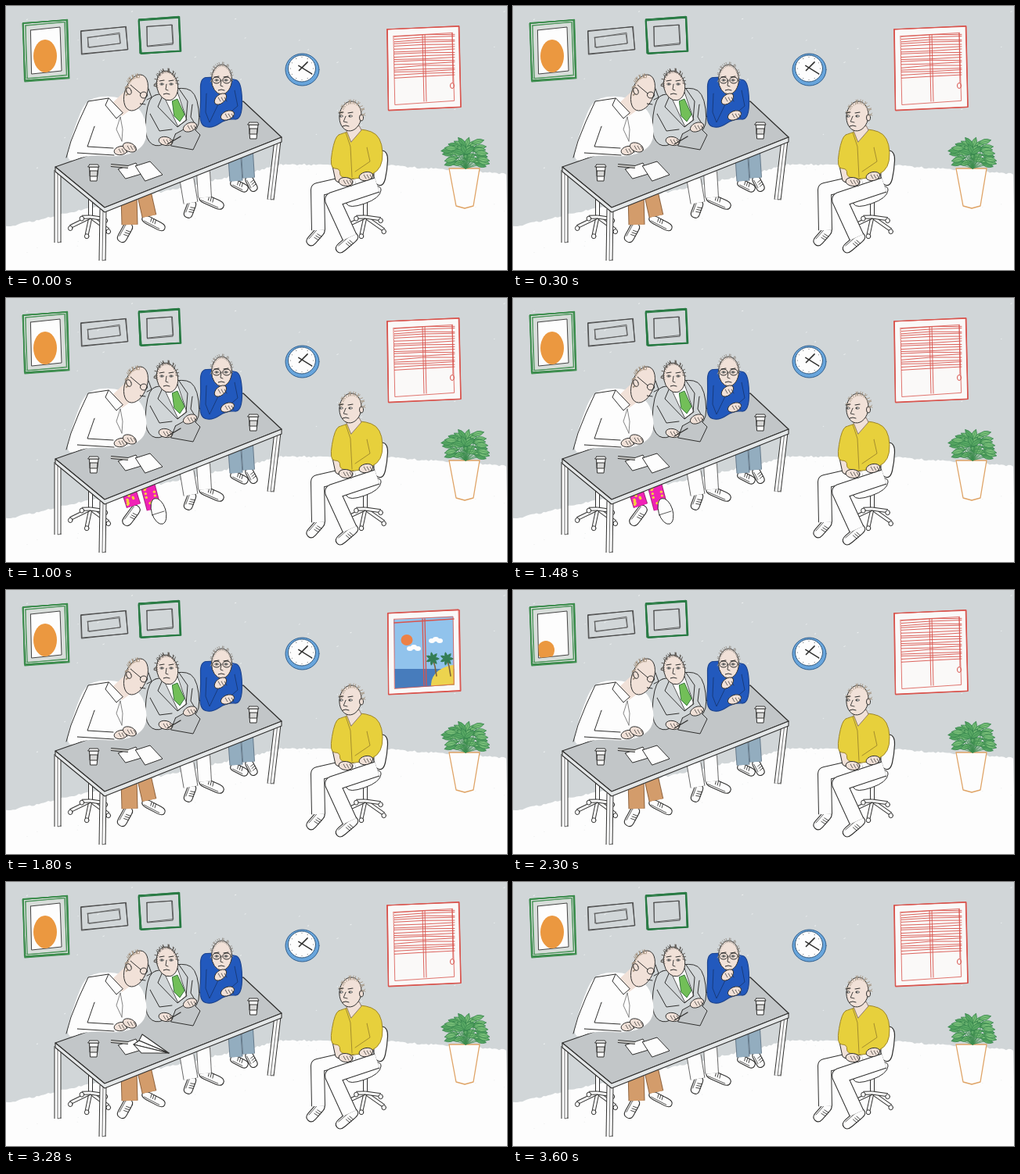
An HTML page with a canvas that plays this animation: 640x338 px, repeating every 4100 ms.

```html
<!DOCTYPE html>
<html lang="en">
<head>
<meta charset="utf-8">
<title>Interview room</title>
<style>
html, body { margin: 0; width: 100%; height: 100%; overflow: hidden; background: #fdfdfd; }
canvas { display: block; width: 640px; height: 338px; }
</style>
</head>
<body>
<canvas id="stage"></canvas>
<script>
const canvas = document.getElementById('stage');
const ctx = canvas.getContext('2d');
const ratio = window.devicePixelRatio || 1;
canvas.width = 640 * ratio;
canvas.height = 338 * ratio;

const INK = '#30302f', WALL = '#d1d6d8', WHITE = '#fdfdfd', SKIN = '#f1e1d8';
const RED = '#d9534c', GREEN = '#3b8c4c', TOP = '#c2c6c8';
const { PI, sin, cos, atan2, hypot } = Math;

let seed;
const random = () => (seed = seed * 16807 % 2147483647) / 2147483647;
const jitter = size => (random() - 0.5) * 2 * size;
const repeat = (count, action) => { for (let i = 0; i < count; i++) action(i); };

function paint(fill, color, width = 1) {
  if (fill) { ctx.fillStyle = fill; ctx.fill(); }
  if (color) { ctx.strokeStyle = color; ctx.lineWidth = width; ctx.stroke(); }
}

function route(points) {
  ctx.beginPath();
  points.forEach(([x, y]) => ctx.lineTo(x, y));
}

function polygon(points, fill, color = INK, width = 1) {
  route(points);
  ctx.closePath();
  paint(fill, color, width);
}

function line(points, width = 1, color = INK) {
  route(points);
  paint(null, color, width);
}

// Closed soft outline that bends around its corner points.
function blob(points, fill, color = INK, width = 1) {
  ctx.beginPath();
  const n = points.length;
  for (let i = 0; i <= n; i++) {
    const [x, y] = points[i % n], [nx, ny] = points[(i + 1) % n];
    if (i === 0) ctx.moveTo((x + nx) / 2, (y + ny) / 2);
    else ctx.quadraticCurveTo(x, y, (x + nx) / 2, (y + ny) / 2);
  }
  paint(fill, color, width);
}

function oval(x, y, rx, ry, fill, color, turn = 0, width = 1) {
  ctx.beginPath();
  ctx.ellipse(x, y, rx, ry, turn, 0, PI * 2);
  paint(fill, color, width);
}

// Outlined strip with open ends, for legs and arms.
function limb(points, width, fill = WHITE, color = INK) {
  ctx.lineCap = 'butt';
  line(points, width + 1, color);
  line(points, width - 1, fill);
  ctx.lineCap = 'round';
}

function panel(x, y, w, h, rise, inset = 0) {
  const l = x + inset, r = x + w - inset, t = y + inset, b = y + h - inset;
  return [[l, t], [r, t - rise], [r + 2, b - rise], [l + 2, b]];
}

function sketch(points, color, width, passes = 2) {
  repeat(passes, () => polygon(points.map(([x, y]) => [x + jitter(1), y + jitter(1)]), null, color, width));
}

function clipped(points, action) {
  ctx.save();
  route(points);
  ctx.clip();
  action();
  ctx.restore();
}

function shoe(heelX, heelY, toeX, toeY, width = 11) {
  const length = hypot(toeX - heelX, toeY - heelY), w = width / 2;
  ctx.save();
  ctx.translate(heelX, heelY);
  ctx.rotate(atan2(toeY - heelY, toeX - heelX));
  blob([[-3, -w], [length * 0.5, -w], [length + 3, -w], [length + 3, w], [length * 0.5, w], [-3, w]], WHITE, INK, 1.1);
  line([[1, w - 2], [length - 3, w - 2]], 0.7);
  repeat(3, i => line([[length * 0.3 + i * 3, -w], [length * 0.3 + i * 3 + 1, 0]], 0.8));
  ctx.restore();
}

function hand(x, y, turn = 0) {
  oval(x, y, 9, 5.5, SKIN, INK, turn);
  repeat(3, i => line([[x - 3 + i * 4, y - 2], [x + i * 4, y + 3]], 0.7));
}

function hair(x, y, rx, ry, from, to, color) {
  const count = 20;
  repeat(count, i => {
    const a = from + (to - from) * i / (count - 1), lean = a + jitter(0.25);
    line([[x + cos(a) * rx * 0.78, y + sin(a) * ry * 0.78],
          [x + cos(lean) * rx * 1.06, y + sin(lean) * ry * 1.06]], 1, color);
  });
}

function face(x, y, look = 0) {
  for (const side of [-1, 1]) {
    const ex = x + side * 6 + look;
    line([[ex - 3, y - 4], [ex + 3, y - 5]], 1.1);
    oval(ex, y, 2.4, 1.2, WHITE, INK, 0, 0.7);
    oval(ex + look / 3, y, 0.9, 0.9, INK);
  }
  line([[x + look, y], [x + look * 1.6 - 1, y + 7], [x + look + 2, y + 8]], 0.9);
  line([[x + look - 4, y + 13], [x + look, y + 12], [x + look + 4, y + 13]], 1);
}

function room() {
  ctx.fillStyle = WALL;
  ctx.fillRect(0, 0, 640, 338);
  const floorY = x => x < 350 ? 283 - x * 0.226 : 203 + (x - 470) * 0.07 * (x > 470);
  const edge = [[0, 338]];
  repeat(214, i => edge.push([i * 3, floorY(i * 3) + jitter(1.3)]));
  polygon([...edge, [642, 338]], WHITE, null);
  repeat(35, () => {
    const x = random() * 640;
    oval(x, random() * floorY(x), 0.5 + random(), 0.5, '#edf0f1', null, -0.5);
    oval(x, floorY(x) + random() * 60, 0.6, 0.4, '#dfe2e3');
  });
}

function pictures(ducked) {
  const portrait = [22, 22, 56, 74, 4];
  polygon(panel(...portrait), '#d8ddda', GREEN, 1.5);
  sketch(panel(...portrait), GREEN, 1.2, 3);
  sketch(panel(...portrait, 3), GREEN, 0.8);
  const canvasArea = panel(...portrait, 9);
  polygon(canvasArea, WHITE, '#444');
  clipped(canvasArea, () => ducked ? oval(42, 77, 11, 12, '#eb9840') : oval(50, 64, 15, 21, '#eb9840'));

  const plain = [95, 32, 58, 30, 6], dark = [170, 18, 51, 43, 3.5];
  sketch(panel(...plain), '#444', 0.9);
  sketch(panel(...plain, 9), '#555', 0.8);
  sketch(panel(...dark), '#287a43', 1.4, 4);
  sketch(panel(...dark, 9), '#444', 0.8);
}

function clock(halfPast) {
  oval(378.5, 81.5, 21.5, 20.5, '#68a5dc', '#315f8d');
  oval(378, 80, 17.5, 17, WHITE, '#36597a');
  const hand = (degrees, length, width) => {
    const c = cos(degrees * PI / 180), s = sin(degrees * PI / 180);
    line([[378 - c * 5, 79 - s * 5], [378 + c * length, 79 + s * length]], width);
  };
  repeat(12, i => oval(378 + 14.5 * cos(i * PI / 6), 80 + 14.5 * sin(i * PI / 6), 0.6, 0.6, '#777'));
  hand(halfPast ? -28 : -45, 10, 1.6);
  hand(halfPast ? 84 : 32, 15, 1.4);
}

function leaf(x, y, turn, length, fill, color) {
  ctx.save();
  ctx.translate(x, y);
  ctx.rotate(turn);
  ctx.beginPath();
  ctx.moveTo(-length, 0);
  ctx.quadraticCurveTo(0, -length * 0.8, length, 0);
  ctx.quadraticCurveTo(0, length * 0.8, -length, 0);
  paint(fill, color, 0.8);
  line([[-length, 0], [length, 0]], 0.5, color);
  ctx.restore();
}

function beach() {
  ctx.fillStyle = '#91c3ec';
  ctx.fillRect(480, 20, 110, 120);
  ctx.fillStyle = '#477cbc';
  ctx.fillRect(480, 101, 110, 40);
  oval(512, 64, 7.5, 7, '#ed8146');
  for (const [x, y] of [[521, 75], [549, 65]]) {
    repeat(3, i => oval(x - 5 + i * 5, y - i % 2 * 2, 4, 3, WHITE));
  }
  oval(575, 121, 32, 25, '#ecd34e');
  for (const x of [545, 563]) {
    line([[x + 5, 110], [x + 3, 98], [x, 88]], 1.6, '#80643b');
    repeat(7, i => leaf(x + 4 * cos(i * 0.9), 88 + 4 * sin(i * 0.9), i * 0.9, 5, '#347d55', null));
  }
}

function blinds() {
  repeat(17, i => {
    const y = 39 + i * 3.3;
    line([[496, y + jitter(1)], [534, y - 2 + jitter(1)], [573, y - 3 + jitter(1)]], 0.9, RED);
  });
  line([[570, 34], [571, 98]], 0.9, RED);
  oval(570, 102, 2.5, 3.5, null, RED);
}

function windowView(open) {
  const frame = [487, 30, 92, 104, 4.5], pane = panel(...frame, 8);
  polygon(panel(...frame), '#faf9f8', RED);
  if (open) clipped(pane, beach);
  else blinds();
  sketch(panel(...frame), RED, 0.9);
  sketch(pane, RED, 0.8, 1);
  for (const x of [532, 535]) line([[x, 37], [x + 2, 122]], open ? 1.3 : 0.9, RED);
  if (open) line([[496, 42], [572, 37]], 1.5, RED);
}

function plant() {
  polygon([[566, 208], [605, 208], [597, 256], [586, 259], [575, 256]], WHITE, '#dfa365', 1.3);
  repeat(34, i => {
    const a = -PI * (i * 0.618 % 1), reach = 0.25 + 0.75 * random();
    const x = 587 + cos(a) * 28 * reach, y = 203 + sin(a) * 37 * reach;
    line([[587, 208], [x, y]], 0.7, GREEN);
    leaf(x, y, atan2(sin(a) * 0.6 + 0.35, cos(a)), 8, i % 3 ? '#79bf78' : '#58a863', '#3a8850');
  });
}

function swivelBase(x, y, reach) {
  limb([[x, y - 28], [x, y]], 5);
  repeat(5, i => {
    const a = 0.5 + i * PI * 0.4;
    const fx = x + reach * cos(a), fy = y + 11 + 12 * sin(a);
    limb([[x, y], [fx, fy]], 4);
    oval(fx, fy + 2, 2.8, 3, WHITE, INK);
  });
}

function dots(from, to) {
  repeat(14, i => {
    const k = i / 14;
    oval(from[0] + (to[0] - from[0]) * k + jitter(7), from[1] + (to[1] - from[1]) * k, 1.7, 1.6, '#f4cf3c');
  });
}

function leftManLegs(spotted) {
  if (spotted) {
    shoe(167, 269, 153, 288, 12);
    for (const [from, to] of [[[156, 244], [163, 266]], [[180, 236], [189, 270]]]) {
      limb([from, to], 18, '#f022b6', '#a6257c');
      dots(from, to);
    }
    oval(195, 273, 9, 17, WHITE, INK, -0.3);
    line([[186, 278], [202, 273]], 0.8);
  } else {
    shoe(157, 281, 147, 299, 12);
    shoe(177, 272, 200, 284, 10);
    limb([[157, 243], [158, 280]], 20, '#d39c6b', '#8e633f');
    limb([[176, 238], [183, 269]], 18, '#d39c6b', '#8e633f');
  }
}

function underTable(spotted) {
  swivelBase(108, 270, 26);
  shoe(238, 252, 232, 268);
  shoe(250, 245, 275, 256);
  limb([[231, 222], [236, 252]], 18, WHITE, '#666');
  limb([[252, 212], [254, 245]], 17, WHITE, '#666');
  shoe(290, 226, 306, 234, 10);
  shoe(310, 221, 317, 234, 10);
  limb([[292, 195], [294, 224]], 16, '#93adbf', '#65798a');
  limb([[308, 188], [310, 220]], 15, '#93adbf', '#65798a');
  leftManLegs(spotted);
}

function table() {
  const corners = [[63, 206], [126, 258], [352, 168], [303, 122]];
  for (const [x, top, lean, bottom] of [[66, 210, 0, 303], [124, 260, -1, 326], [347, 172, -9, 248]]) {
    limb([[x, top], [x + lean, bottom]], 8);
    line([[x, top], [x + lean, bottom], [x + lean + 4, bottom - 1]], 0.7);
  }
  polygon(corners, TOP, INK, 1.3);
  const rim = corners.slice(0, 3);
  polygon([...rim, ...rim.map(([x, y]) => [x, y + 6]).reverse()], '#e4e7e8', INK, 1.1);
}

function cup(x, y) {
  const band = (top, bottom, wide, narrow, fill) =>
    polygon([[x - wide, y + top], [x + wide, y + top], [x + narrow, y + bottom], [x - narrow, y + bottom]], fill);
  band(-7, 11, 6, 4, WHITE);
  band(-2, 5, 5, 4.5, '#d8d8d7');
  band(-10, -7, 5.5, 7, WHITE);
}

function rightMan() {
  blob([[264, 91], [248, 92], [249, 120], [247, 152], [263, 157], [282, 144], [302, 146], [301, 96], [286, 93]], '#2259bd', '#1d448e', 1.2);
  line([[256, 112], [255, 136], [260, 149], [271, 126]], 1, '#183b7c');
  line([[292, 108], [296, 128], [282, 140]], 1, '#183b7c');
  oval(275.5, 94, 13, 19, SKIN, INK);
  hair(275.5, 92, 14, 19, -PI, 0, '#99948e');
  face(275, 95);
  for (const x of [269, 282]) oval(x, 95, 5.2, 4, null, INK);
  hand(274, 119, -0.7);
  hand(283, 140, -0.4);
}

function middleMan() {
  blob([[200, 113], [182, 115], [176, 165], [190, 182], [212, 172], [230, 165], [249, 156], [243, 108], [218, 104]], WALL);
  polygon([[202, 117], [219, 110], [231, 146], [220, 154]], WHITE, '#555');
  polygon([[212, 122], [219, 119], [228, 139], [222, 148], [215, 141]], '#72bf58', '#39773f');
  line([[200, 115], [194, 129], [219, 155], [230, 146], [232, 122], [221, 106]]);
  line([[184, 138], [196, 160], [212, 158]]);
  line([[238, 126], [236, 142], [242, 152]]);
  oval(206, 102, 13.5, 19, SKIN, INK, -0.2);
  hair(205, 100, 15, 19, -PI * 1.1, -0.1, '#5d5853');
  face(205, 100);
  polygon([[216, 164], [236, 153], [248, 165], [239, 184], [211, 179]], TOP);
  hand(204, 173, 0.2);
  hand(235, 155, -0.4);
  line([[206, 177], [223, 167]], 1.4);
}

function leftMan() {
  blob([[134, 114], [104, 119], [92, 142], [73, 203], [104, 190], [150, 194], [180, 178], [179, 144], [164, 124]], WHITE, null);
  line([[131, 118], [105, 122], [93, 148], [83, 173], [77, 194]]);
  line([[113, 154], [104, 180], [137, 182]]);
  line([[91, 188], [138, 191]]);
  polygon([[137, 123], [152, 109], [166, 128], [148, 141]], SKIN, null);
  oval(166, 111, 14, 24, SKIN, INK, 0.35);
  hair(168, 106, 15, 18, -PI * 1.15, -PI * 0.45, '#a3917d');
  oval(157, 109, 3, 4.5, SKIN, INK, -0.3);
  oval(176, 114, 4.5, 4, null, INK);
  line([[159, 101], [172, 112]]);
  line([[182, 106], [186, 117], [180, 120]]);
  line([[171, 125], [178, 126]]);
  polygon([[131, 118], [127, 127], [141, 144], [149, 137]], WHITE);
  for (const x of [141, 149]) line([[146, 142], [x, 158], [148, 173]], 0.8, '#666');
  hand(147, 185, -0.2);
  hand(158, 181, 0.4);
}

function papers(folded) {
  polygon([[143, 209], [166, 201], [173, 215], [153, 221]], WHITE);
  if (folded) {
    const nose = [208, 219];
    for (const [a, b] of [[[174, 195], [170, 203]], [[170, 203], [163, 208]], [[163, 208], [173, 219]]]) {
      polygon([a, b, nose], WHITE, INK, 1.1);
    }
  } else {
    polygon([[165, 205], [184, 199], [200, 216], [178, 224]], WHITE);
  }
  limb([[134, 204], [156, 206]], 3, '#c8c8c5');
}

function candidate() {
  swivelBase(459, 270, 27);
  blob([[473, 184], [488, 186], [487, 210], [482, 232], [468, 226]], WHITE, INK, 1.2);
  blob([[432, 246], [480, 226], [478, 246], [438, 260]], WHITE);
  shoe(403, 286, 388, 303, 12);
  shoe(446, 294, 425, 312, 12);
  limb([[446, 224], [398, 235], [399, 287]], 17);
  limb([[474, 229], [417, 248], [439, 296]], 19);
  limb([[421, 202], [425, 221], [443, 226]], 9, SKIN);
  blob([[430, 163], [420, 167], [413, 208], [427, 208], [426, 220], [452, 222], [482, 209], [480, 166], [453, 156]], '#e7d03c', '#9c852c');
  polygon([[434, 158], [451, 153], [454, 159], [441, 174]], SKIN, '#8e7b70');
  line([[434, 162], [440, 180], [442, 219]], 0.9, '#9c852c');
  line([[461, 181], [465, 199], [446, 212]], 0.9, '#9c852c');
  hand(460, 218, -0.2);
  hand(434, 225, 0.1);
  oval(440, 141, 14, 19, SKIN, INK, 0.12);
  oval(454, 143, 2.5, 4, SKIN, INK);
  hair(442, 140, 16, 19, -PI, 0.05, '#aa9c8b');
  face(437, 141, -3);
}

function draw(time) {
  const t = time % 4100;
  const during = (from, to) => t >= from && t < to;
  seed = 71;
  ctx.setTransform(ratio, 0, 0, ratio, 0, 0);
  ctx.lineCap = ctx.lineJoin = 'round';
  room();
  pictures(during(2300, 2800));
  plant();
  clock(during(500, 1000));
  swivelAndPeople(during(1000, 1800), during(2800, 3600));
  windowView(during(1800, 2300));
}

function swivelAndPeople(spotted, folded) {
  seed = 29;
  underTable(spotted);
  table();
  seed = 43;
  rightMan();
  middleMan();
  leftMan();
  papers(folded);
  cup(112, 213);
  cup(316, 159);
  candidate();
}

const start = performance.now();
function tick() {
  draw(performance.now() - start);
  requestAnimationFrame(tick);
}
tick();
</script>
</body>
</html>
```
